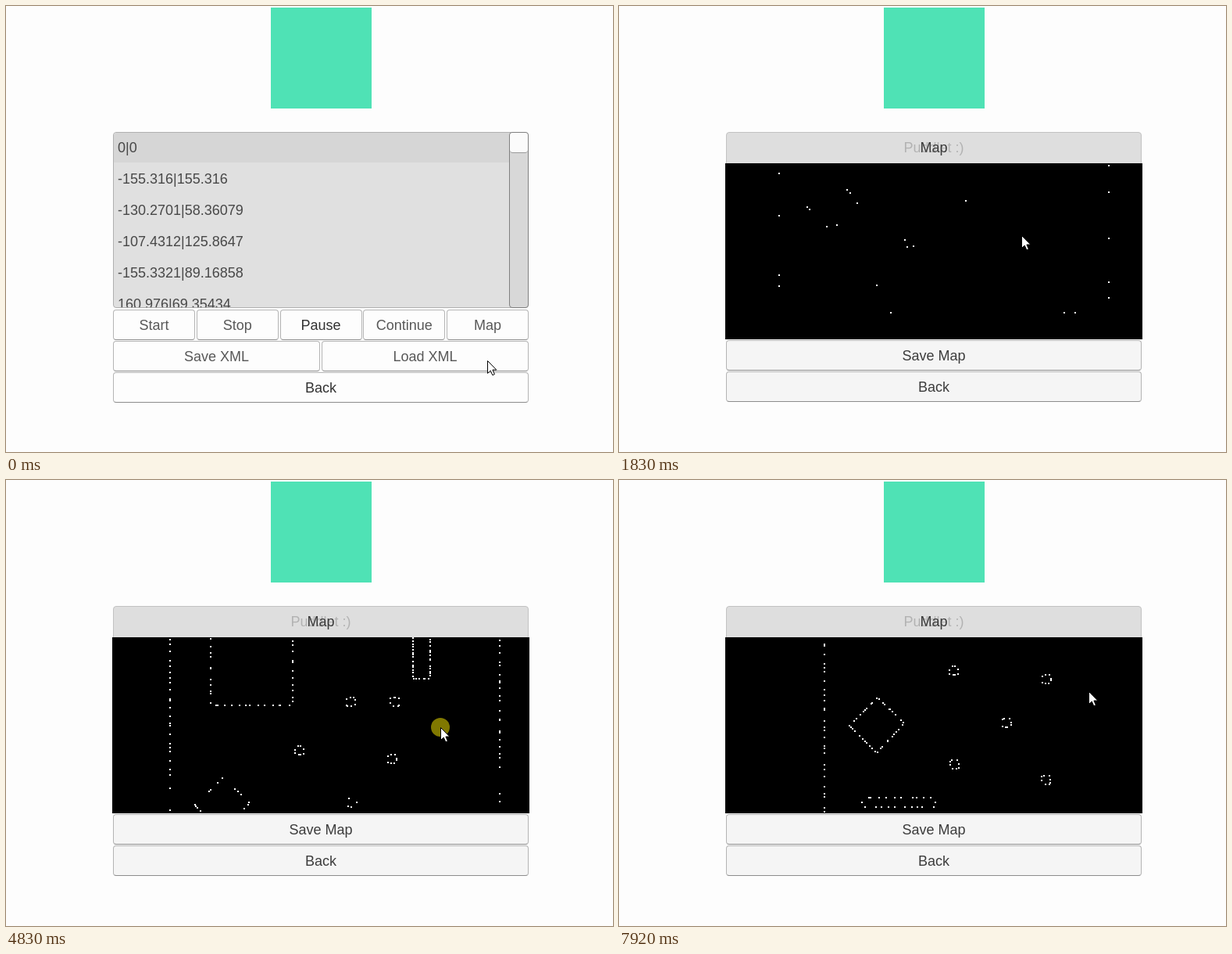
An HTML page with a canvas for the animation above (7990 ms loop, 777 px wide and 570 px high).

```html
<!DOCTYPE html>
<html lang="en">
<head>
<meta charset="utf-8">
<title>Map</title>
<style>
html, body { margin: 0; width: 100%; height: 100%; overflow: hidden; background: #fdfdfd; }
body { position: relative; font: 18px/38px "Liberation Sans", Arial, sans-serif; font-kerning: none; color: #323232; }
.screen, .screen *, #logo, #cursor { position: absolute; box-sizing: border-box; }
.screen { left: 0; top: 0; width: 777px; height: 570px; }
#logo { left: 339px; top: 2px; width: 129px; height: 129px; background: #4fe2b5; }
.btn { height: 39px; border: 1px solid #b4b4b4; border-bottom-color: #8c8c8c; border-radius: 4px;
  background: #fdfdfd; text-align: center; white-space: nowrap; }
.btn.hover { background: #f5f5f5; }
.soft { color: #585858; }
#list { left: 137px; top: 161px; width: 532px; height: 225px; overflow: hidden; background: #e0e0e0;
  border: 1px solid #b0b0b0; border-radius: 4px; color: #484848; }
#list i { left: 0; top: 0; width: 100%; height: 38px; background: #d6d6d6; }
#list span { left: 5px; white-space: nowrap; }
#bar { left: 644px; top: 161px; width: 25px; height: 225px; background: #d8d8d8; border: 1px solid #808080; border-radius: 4px; }
#thumb { left: 0; top: 0; width: 23px; background: #fbfbfb; border-bottom: 1px solid #999; border-radius: 4px; }
.clicked .btn { background: #e8e8e8; color: #4a4a4a; }
.clicked .soft, .clicked #list { color: #646464; }
.clicked .btn.hover { background: #c9c9c9; }
.clicked #list i { background: none; }
.clicked #thumb { background: #ebebeb; }
#mapScreen { color: #3c3c3c; }
#mapScreen .btn { background: #f5f5f5; }
#mapScreen .hover { background: #ebebeb; }
#head { left: 137px; top: 161px; width: 532px; height: 46px; border: 1px solid #c2c2c2; border-radius: 4px; background: #dedede; text-align: center; }
#head span { left: 0; width: 100%; top: 0; }
#map { left: 136px; top: 201px; }
#cursor { left: 0; top: 0; width: 40px; height: 40px; margin: -15px; overflow: visible; }
</style>
</head>
<body>
<div id="logo"></div>
<div class="screen" id="menu">
  <div id="list"><i></i></div>
  <div id="bar"><div id="thumb"></div></div>
</div>
<div class="screen" id="mapScreen">
  <div id="head"><span style="color:#b2b2b2">Puddlet :)</span><span>Map</span></div>
  <canvas id="map" width="534" height="225"></canvas>
</div>
<svg id="cursor" viewBox="-15 -15 40 40">
  <circle id="press" r="12" fill="#fff000" fill-opacity=".5"/>
  <path d="M.5 .5V16.5L4.2 13L6.8 18.8L9.4 17.7L6.9 12H11.8Z" fill="#fff" stroke="#000"/>
</svg>
<script>
const LOOP = 7990, STEP = 1000 / 13;
const $ = id => document.getElementById(id);
const menu = $('menu'), mapScreen = $('mapScreen');

function add(parent, tag, text, css, className = '') {
  const el = document.createElement(tag);
  el.textContent = text;
  el.className = className;
  Object.assign(el.style, css);
  parent.append(el);
  return el;
}
const button = (screen, text, left, top, width, soft) =>
  add(screen, 'div', text, { left: left + 'px', top: top + 'px', width: width + 'px' }, soft ? 'btn soft' : 'btn');

['0|0', '-155.316|155.316', '-130.2701|58.36079', '-107.4312|125.8647', '-155.3321|89.16858', '160.976|69.35434']
  .forEach((text, i) => add($('list'), 'span', text, { top: i * 40 + 'px' }));

const mapButton = ['Start', 'Stop', 'Pause', 'Continue', 'Map']
  .map((text, i) => button(menu, text, 137 + i * 106.75, 388, 105, text !== 'Pause')).at(-1);
button(menu, 'Save XML', 137, 428, 265, true);
const loadButton = button(menu, 'Load XML', 404, 428, 265, true);
button(menu, 'Back', 137, 468, 532);
const saveButton = button(mapScreen, 'Save Map', 137, 427, 532);
button(mapScreen, 'Back', 137, 467, 532);

let seed = 11;
const random = () => (seed = seed * 16807 % 2147483647) / 2147483647;

// The robot's scan: hits scattered along each outline. The south half is still being explored.
const hits = [];
function scan(corners, spacing) {
  corners.forEach(([x, y], i) => {
    const [endX, endY] = corners[(i + 1) % corners.length];
    const count = Math.round(Math.hypot(endX - x, endY - y) / spacing);
    for (let n = 0; n < count; n++) {
      const k = (n + random()) / count;
      const hit = { x: x + (endX - x) * k, y: y + (endY - y) * k };
      hit.born = hit.y < 370 ? 0 : LOOP * random() ** .7;
      hits.push(hit);
    }
  });
}
const box = (x, y, w, h) => [[x, y], [x + w, y], [x + w, y + h], [x, y + h]];

const room = [[262, 130], [210, 130], [210, 556], [632, 556], [632, 130], [367, 130], [367, 289], [262, 289]];
const diamond = [[278, 381], [312, 414], [277, 452], [242, 417]];
const pillars = [[436, 279], [492, 279], [370, 341], [489, 352], [438, 408], [371, 461], [488, 481]];
scan(room, 8);
scan(diamond, 5);
scan(box(521, 188, 22, 67), 4);
scan(box(258, 509, 94, 12), 9);
pillars.forEach(([x, y]) => scan(box(x, y, 11, 11), 6));

// Pointer stops: time, x, y, and whether the button is held from there on.
const stops = [
  [290, 616, 453, false], [840, 613, 407, false], [1370, 613, 407, false], [1830, 515, 293, true],
  [2300, 515, 279, false], [3060, 530, 350, true], [3440, 531, 415, false], [3950, 552, 204, true],
  [5750, 560, 433, true], [6290, 560, 433, false], [6690, 560, 433, false], [6850, 590, 415, true],
  [7250, 639, 240, false], [7530, 601, 304, true], [7840, 601, 270, false]
];
const MAP_EDGE = 423;
function pointerAt(t) {
  let [, x, y, held] = stops[0], panX = -5, panY = -164;
  for (let i = 0; i < stops.length && t >= stops[i][0]; i++) {
    const [t1, x1, y1, down] = stops[i], [t2, x2, y2] = stops[i + 1] || [LOOP, x1, y1];
    const k = Math.min(1, (t - t1) / (t2 - t1));
    x = x1 + (x2 - x1) * k;
    y = y1 + (y2 - y1) * k;
    held = down;
    if (held) {
      panX += x - x1;
      panY += Math.min(y, MAP_EDGE) - Math.min(y1, MAP_EDGE);
    }
  }
  return { x, y, held, panX, panY };
}

const ctx = $('map').getContext('2d');
function drawMap(t, panX, panY) {
  ctx.fillStyle = '#000';
  ctx.fillRect(0, 0, 534, 225);
  ctx.fillStyle = '#fff';
  for (const { x, y, born } of hits) {
    if (born <= t) ctx.fillRect(Math.round(x + panX - 137), Math.round(y + panY - 202), 2, 2);
  }
}

function render(now) {
  const time = now % LOOP;
  const t = time < 60 ? 0 : 60 + STEP * Math.max(0, Math.floor((time - 58) / STEP));
  const { x, y, held, panX, panY } = pointerAt(t);
  const fade = Math.min(1, Math.max(0, (t - 976) / 230));

  $('thumb').style.height = t ? '57px' : '26px';
  loadButton.classList.toggle('hover', t > 0 && y > 428);
  mapButton.classList.toggle('hover', y < 427);
  saveButton.classList.toggle('hover', y > 427);
  menu.classList.toggle('clicked', t > 880);
  menu.style.opacity = 1 - fade * fade;
  mapScreen.style.opacity = fade;
  $('press').style.display = held ? '' : 'none';
  $('cursor').style.transform = `translate(${Math.round(x)}px, ${Math.round(y)}px)`;
  drawMap(t, panX, panY);
}

const start = performance.now();
function tick() {
  render(performance.now() - start);
  requestAnimationFrame(tick);
}
tick();
</script>
</body>
</html>
```
